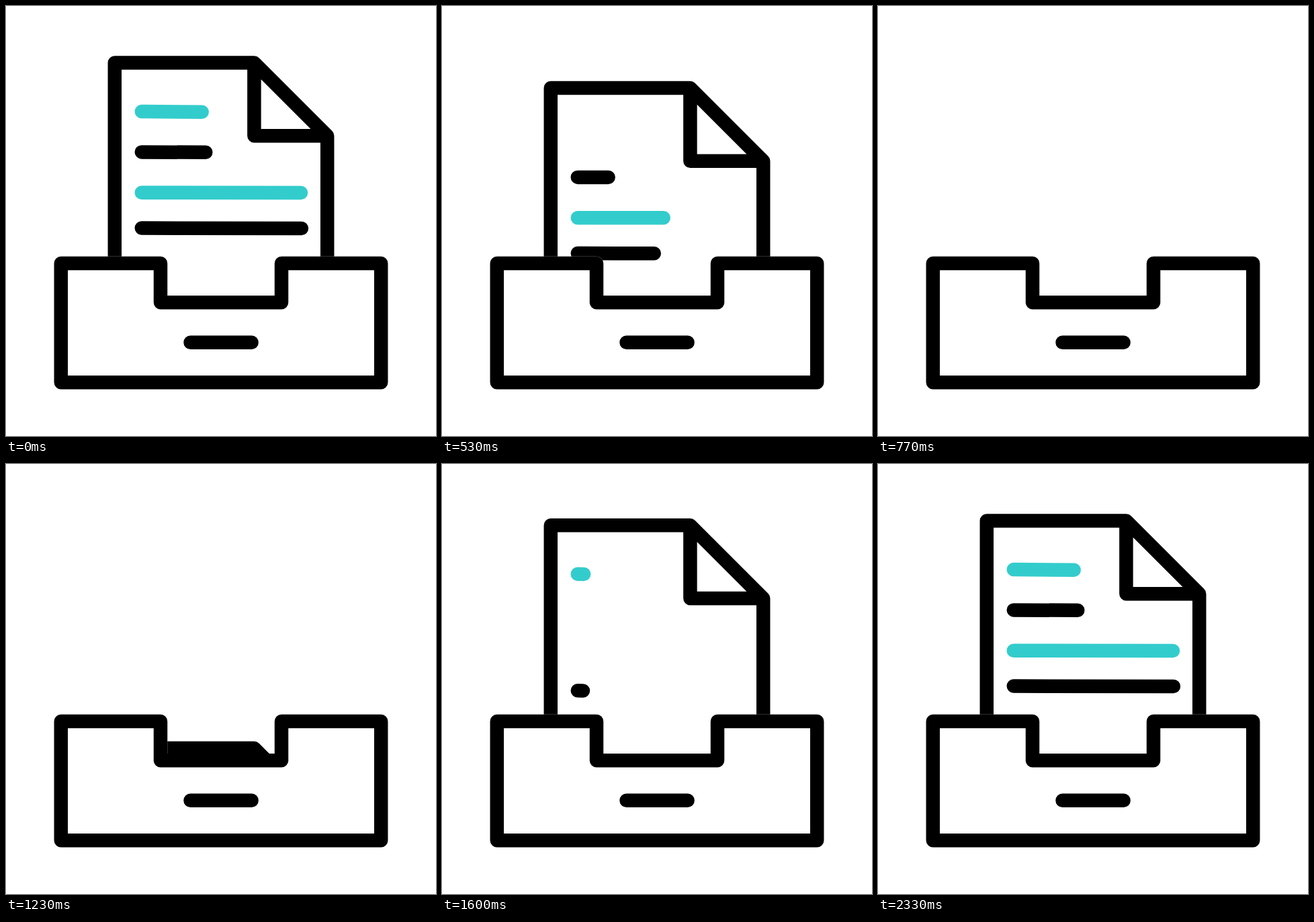
An HTML page for the animation above (2500 ms loop, 640x640 px).

```html
<!DOCTYPE html>
<html lang="en">
<head>
<meta charset="utf-8">
<title>Inbox tray</title>
<style>
  html, body { margin: 0; width: 100%; height: 100%; overflow: hidden; background: #fff; }
  svg { display: block; width: 100%; height: 100%; }
  path, line {
    fill: none;
    stroke: #000;
    stroke-width: 20.5;
    stroke-linecap: round;
    stroke-linejoin: round;
  }
  .accent { stroke: #33cccc; }
  .mask { fill: #fff; stroke: #fff; }
</style>
</head>
<body>
<svg viewBox="0 0 640 640">
  <defs>
    <clipPath id="above"><rect width="640" height="442"/></clipPath>
    <path id="tray" d="M81.8 383H230V441.2H410V383H558.2V560.2H81.8Z"/>
  </defs>
  <g clip-path="url(#above)">
    <g id="page">
      <path d="M161.8 500V84.4H369.4L478.2 193.2V500M369.4 84.4V193.2H478.2"/>
      <line class="accent" x1="201.8" y1="157.1" x2="291.7" y2="157.7"/>
      <line x1="201.8" y1="217.4" x2="297.3" y2="217.8"/>
      <line class="accent" x1="201.8" y1="277.7" x2="439" y2="278"/>
      <line x1="201.8" y1="330.6" x2="439.9" y2="330.9"/>
    </g>
  </g>
  <path class="mask" d="M81.8 383H230V441.2H410V383H558.2V560.2H81.8Z"/>
  <use href="#tray"/>
  <line x1="274.5" y1="500.7" x2="365.6" y2="500.7"/>
</svg>
<script>
  const LOOP = 2500;
  const FPS = 30;
  const DROP = 430;

  // Each span is [start, end] in ticks of 1/30 s.
  const pageMove = { leave: [14, 25], enter: [31.8, 49.3] };
  const lineMoves = [
    { leave: [1, 16], enter: [45, 60] },
    { leave: [8.3, 23.3], enter: [50, 65] },
    { leave: [7, 26], enter: [51, 69.7] },
    { leave: [7, 24.5], enter: [46, 64] },
  ];

  const page = document.getElementById("page");
  const lines = [...page.querySelectorAll("line")].map((el, i) => ({
    el,
    move: lineMoves[i],
    x: +el.getAttribute("x1"),
    y: +el.getAttribute("y1"),
    dx: el.getAttribute("x2") - el.getAttribute("x1"),
    dy: el.getAttribute("y2") - el.getAttribute("y1"),
  }));

  function ease(tick, [start, end]) {
    const s = Math.min(1, Math.max(0, (tick - start) / (end - start)));
    return s * s * (3 - 2 * s);
  }

  const presence = (tick, { leave, enter }) => 1 - ease(tick, leave) + ease(tick, enter);

  function draw(now) {
    // The motion is stepped; the bias absorbs rounding of step times to 10 ms.
    const tick = Math.floor((now % LOOP) * FPS / 1000 + 0.15);
    const drop = DROP * (1 - presence(tick, pageMove));
    page.setAttribute("transform", `translate(0 ${drop.toFixed(2)})`);
    for (const { el, move, x, y, dx, dy } of lines) {
      const part = presence(tick, move);
      el.setAttribute("x2", x + dx * part);
      el.setAttribute("y2", y + dy * part);
      el.setAttribute("visibility", part > 0.0001 ? "visible" : "hidden");
    }
  }

  let origin;
  function loop(now) {
    origin ??= now;
    draw(now - origin);
    requestAnimationFrame(loop);
  }
  draw(0);
  requestAnimationFrame(loop);
</script>
</body>
</html>
```
